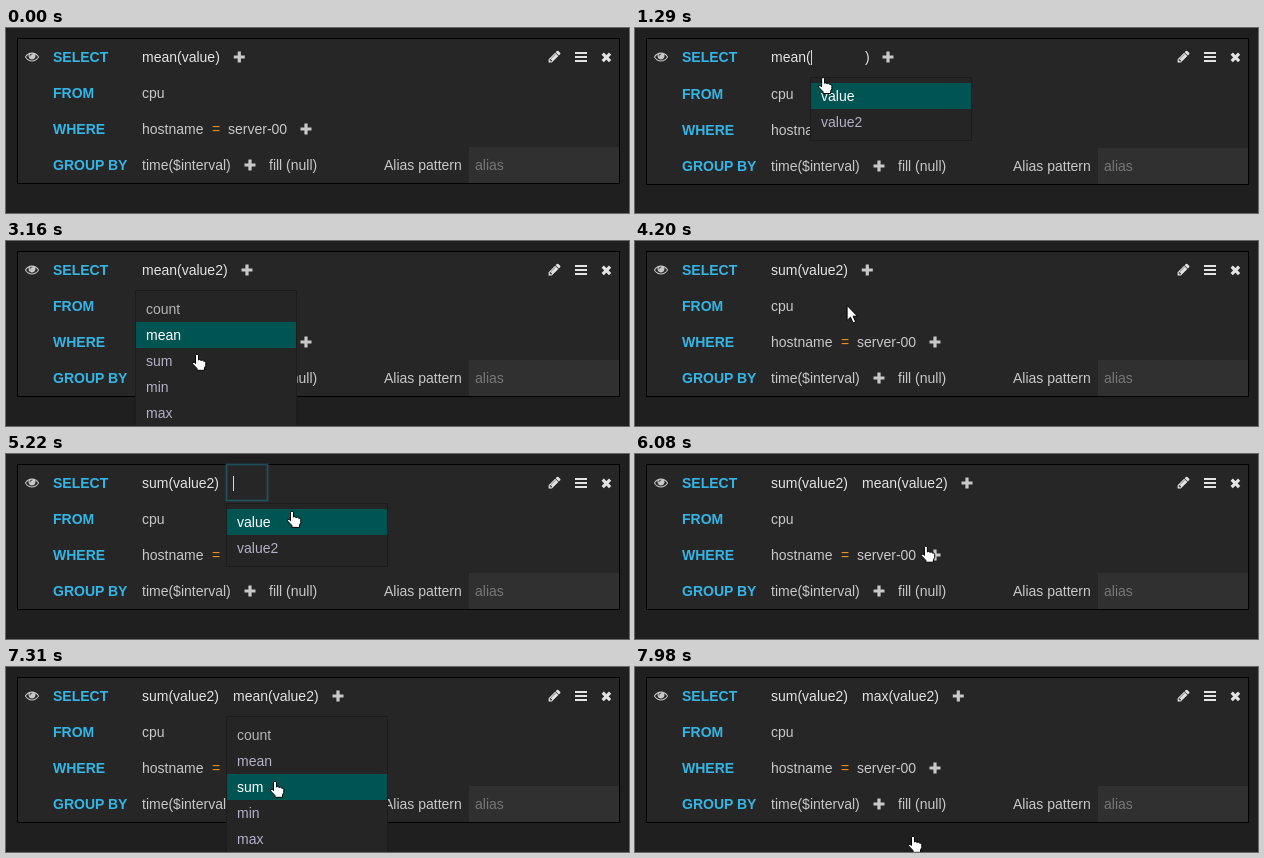
Recreate the animation shown at these times as an HTML page. Size 623 px wide and 185 px high, loop 8 s.

```html
<!DOCTYPE html>
<html lang="en">
<head>
<meta charset="utf-8">
<title>Query editor</title>
<style>
html, body { margin: 0; width: 100%; height: 100%; overflow: hidden; background: #1f1f1f; }
svg { display: block; font: 14px "Liberation Sans", Arial, sans-serif; fill: #c8c8c8; }
text { white-space: pre; }
.key { font-weight: bold; fill: #33b5e5; }
.link { fill: #e3e3e3; }
.cursor { fill: #fff; stroke: #000; stroke-linejoin: round; }
</style>
</head>
<body>
<svg width="623" height="185" viewBox="0 0 623 185">
  <defs>
    <path id="plus" d="M-5.5 0H5.5M0-5.5V5.5" fill="none" stroke="#c8c8c8" stroke-width="3.2"/>
  </defs>
  <rect width="623" height="185" fill="#1f1f1f"/>
  <rect id="panel" x="11.5" y="10.5" width="602" height="145" fill="#262626" stroke="#000"/>

  <path transform="translate(19 21.5) scale(.0078125)" d="M1664 960q-152-236-381-353 61 104 61 225 0 185-131.5 316.5t-316.5 131.5-316.5-131.5-131.5-316.5q0-121 61-225-229 117-381 353 133 205 333.5 326.5t434.5 121.5 434.5-121.5 333.5-326.5zm-720-384q0-20-14-34t-34-14q-125 0-214.5 89.5t-89.5 214.5q0 20 14 34t34 14 34-14 14-34q0-86 61-147t147-61q20 0 34-14t14-34zm848 384q0 34-20 69-140 230-376.5 368.5t-499.5 138.5-499.5-139-376.5-368q-20-35-20-69t20-69q140-229 376.5-368t499.5-139 499.5 139 376.5 368q20 35 20 69z"/>
  <g class="link">
    <path transform="translate(541.6 21.5) scale(.0078125)" d="M491 1536l91-91-235-235-91 91v107h128v128h107zm523-928q0-22-22-22-10 0-17 7l-542 542q-7 7-7 17 0 22 22 22 10 0 17-7l542-542q7-7 7-17zm-54-192l416 416-832 832h-416v-416zm683 96q0 53-37 90l-166 166-416-416 166-165q36-38 90-38 53 0 91 38l235 234q37 39 37 91z"/>
    <path d="M569 24h12v2h-12zM569 28h12v2h-12zM569 32h12v2h-12z"/>
    <path d="M596.7 25.7l7.4 7.4M604.1 25.7l-7.4 7.4" stroke="#e3e3e3" stroke-width="3.2"/>
  </g>

  <text class="key" x="47" y="34">SELECT</text>
  <text class="link" id="func1" x="136" y="34"></text>
  <text class="link" id="func2" x="227" y="34"></text>
  <text class="link" id="close" x="230" y="34">)</text>
  <use id="add" href="#plus" y="29"/>

  <g id="lower">
    <text class="key" x="47" y="70">FROM</text>
    <text x="136" y="70">cpu</text>
    <text class="key" x="47" y="106">WHERE</text>
    <text x="136" y="106">hostname</text>
    <text x="206" y="106" fill="#f79520">=</text>
    <text x="222" y="106">server-00</text>
    <use href="#plus" x="300" y="101"/>
    <text class="key" x="47" y="142">GROUP BY</text>
    <text x="136" y="142">time($interval)</text>
    <use href="#plus" x="244" y="137"/>
    <text x="263" y="142">fill (null)</text>
    <text x="378" y="142">Alias pattern</text>
    <rect x="463" y="119" width="150" height="36" fill="#303030"/>
    <text x="469" y="142" fill="#777">alias</text>
  </g>

  <g id="input" fill="none" stroke="#1f5a66">
    <rect x="220.5" y="10.5" width="41" height="36" stroke-width="3" opacity=".3"/>
    <rect x="220.5" y="10.5" width="41" height="36" opacity=".8"/>
  </g>
  <rect id="caret" y="22" width="1" height="15" fill="#d8d8d8"/>
  <g id="menu"></g>
  <path id="cursor" class="cursor"/>
</svg>
<script>
const LOOP = 8000;
const $ = id => document.getElementById(id);
const show = (id, on) => $(id).setAttribute("display", on ? "inline" : "none");
const set = (id, name, value) => $(id).setAttribute(name, value);

const SHAPES = {
  arrow: "M0 0V15L3.4 11.8 6 17.5 8.6 16.4 6 10.8H10.3Z",
  hand: "M-1.5 1.2Q0-1 1.5 1.2V6Q2.8 4.8 4 6.4Q5.5 5.4 6.4 7Q8.5 6.5 8.8 8.5V11.5L7.5 14V16.3H0V14.5L-4.6 9.7Q-4.6 7.6-2.8 8.3L-1.5 9.6Z",
  beam: "M-2-7H-.5V7H-2V8H2V7H.5V-7H2V-8H-2Z"
};

// time, x, y, shape until the next key
const PATH = [
  [640, 231, 42, "arrow"], [680, 231, 42, "arrow"], [830, 186, 27, "hand"],
  [910, 181, 24, "hand"], [1090, 181, 24, "beam"], [1250, 186, 42, "hand"],
  [1530, 200, 92, "hand"], [1960, 200, 92, "arrow"], [2030, 200, 91, "arrow"],
  [2170, 197, 63, "arrow"], [2390, 158, 18, "hand"], [2490, 153, 25, "hand"],
  [2780, 153, 25, "hand"], [3160, 191, 113, "hand"], [3640, 191, 113, "arrow"],
  [3800, 191, 112, "arrow"], [4390, 222, 42, "arrow"], [4480, 228, 32, "hand"],
  [4550, 231, 24, "hand"], [4860, 231, 24, "hand"], [5220, 286, 57, "hand"],
  [5500, 290, 91, "hand"], [5770, 290, 91, "hand"], [5930, 291, 92, "hand"],
  [6080, 291, 92, "hand"], [6130, 286, 86, "arrow"], [6390, 238, 31, "hand"],
  [6450, 233, 25, "hand"], [6700, 233, 25, "hand"], [7310, 269, 114, "hand"],
  [7390, 270, 117, "hand"], [7430, 270, 117, "hand"], [7790, 278, 169, "hand"],
  [LOOP, 278, 169, "hand"]
];

const FIELDS = ["value", "value2"];
const FUNCS = ["count", "mean", "sum", "min", "max"];
// marks: [time, highlighted item]
const MENUS = [
  { from: 1130, to: 1960, x: 176, items: FIELDS, marks: [[1130, 0], [1450, 1]] },
  { from: 2730, to: 3640, x: 130, items: FUNCS, marks: [[2730, 1], [2930, 0], [3030, 1], [3590, 2]] },
  { from: 4820, to: 5800, x: 221, items: FIELDS, marks: [[4820, 0], [5400, 1]] },
  { from: 6590, to: 7980, x: 221, items: FUNCS,
    marks: [[6590, 1], [6910, 0], [7090, 1], [7270, 2], [7530, 3], [7700, 4]] }
];

function drawMenu(t) {
  const menu = MENUS.find(m => t >= m.from && t < m.to);
  if (!menu) return "";
  const { x, items } = menu;
  const active = menu.marks.filter(m => m[0] <= t).pop()[1];
  const rows = items.map((name, i) => {
    const y = 55 + 26 * i;
    const on = i === active;
    const fill = on ? "#fff" : i ? "#b5b0c6" : "#b4b4b4";
    return (on ? `<rect x="${x}" y="${y}" width="160" height="26" fill="#005553"/>` : "") +
      `<text x="${x + 10}" y="${y + 18}" fill="${fill}">${name}</text>`;
  });
  return `<rect x="${x - .5}" y="49.5" width="161" height="${items.length * 26 + 11}" fill="#252525" stroke="#1c1c1c"/>` + rows.join("");
}

function drawCursor(t) {
  show("cursor", t >= PATH[0][0]);
  const i = PATH.findIndex(k => k[0] > t);
  if (i < 1) return;
  const [t0, x0, y0, shape] = PATH[i - 1];
  const [t1, x1, y1] = PATH[i];
  const p = (t - t0) / (t1 - t0);
  const x = x0 + (x1 - x0) * p, y = y0 + (y1 - y0) * p;
  set("cursor", "d", SHAPES[shape]);
  set("cursor", "transform", `translate(${x.toFixed(1)} ${y.toFixed(1)})`);
}

let lastMenu = null;
function render(t) {
  const editing = t >= 1090 && t < 1960;
  const adding = t >= 4780 && t < 5800;

  $("func1").textContent = t < 1090 ? "mean(value)" : editing ? "mean(" :
    t < 3640 ? "mean(value2)" : "sum(value2)";
  $("func2").textContent = t < 5800 ? "" : t < 7980 ? "mean(value2)" : "max(value2)";
  show("close", editing);
  show("add", !adding);
  set("add", "x", t < 1090 ? 233.3 : editing ? 253 : t < 3640 ? 241 :
    t < 5800 ? 232.3 : t < 7980 ? 332 : 323.3);

  set("panel", "height", editing ? 146 : 145);
  set("lower", "transform", `translate(0 ${editing ? 1 : 0})`);

  // the focus glow eases in, then fades after the field closes
  const glow = t < 5800 ? (t - 4780) / 200 : (5930 - t) / 130;
  set("input", "opacity", Math.max(0, Math.min(1, glow)));
  show("caret", editing && t < 1530 || adding && t < 5280);
  set("caret", "x", editing ? 176 : 227);

  const menu = drawMenu(t);
  if (menu !== lastMenu) $("menu").innerHTML = lastMenu = menu;
  drawCursor(t);
}

function tick() {
  render(performance.now() % LOOP);
  requestAnimationFrame(tick);
}
tick();
</script>
</body>
</html>
```
